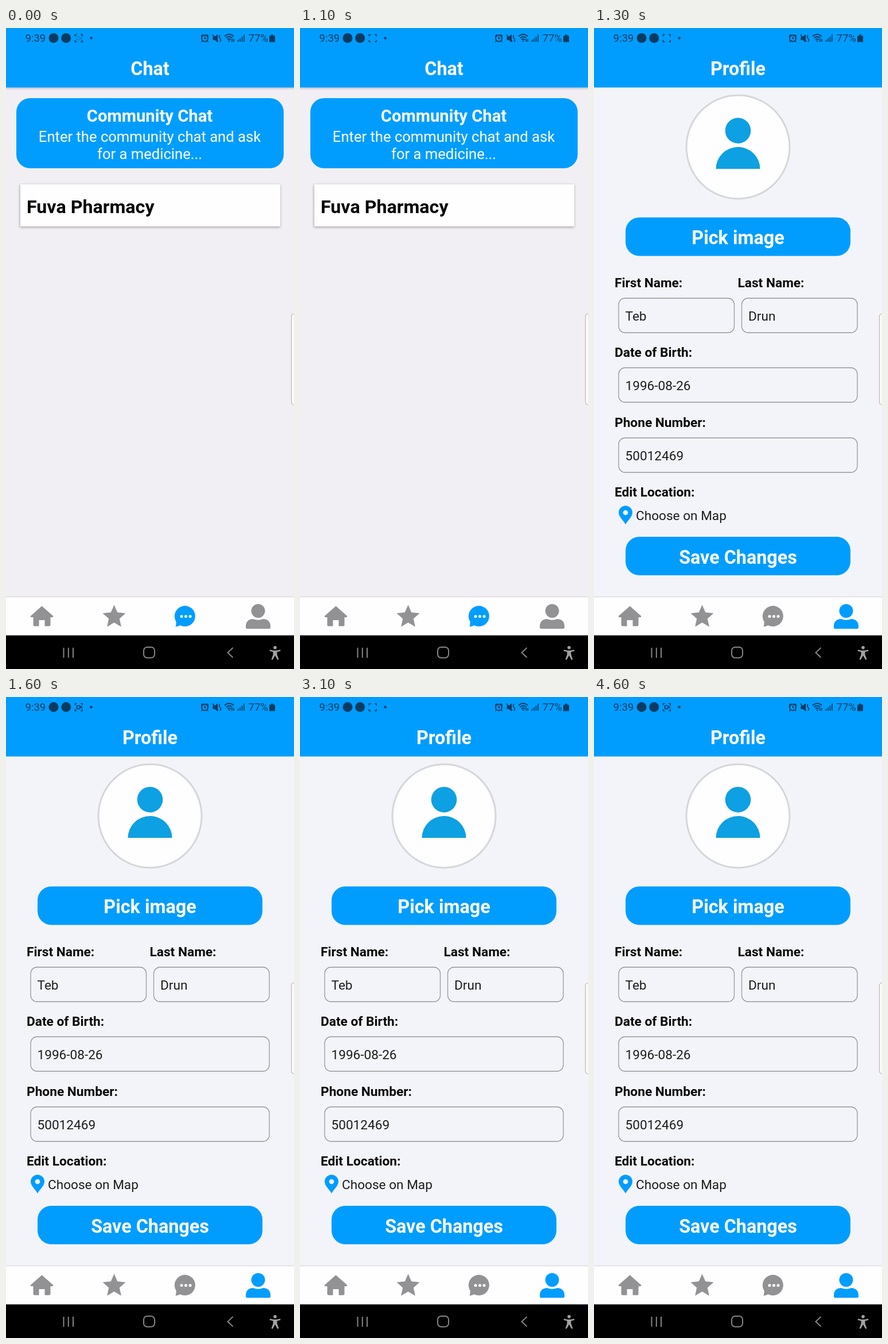
These frames come from a looping animation (502x1115 px, 4.8 s). An HTML page:

```html
<!DOCTYPE html>
<html lang="en">
<head>
<meta charset="utf-8">
<title>Chat and profile screens</title>
<style>
html, body { margin: 0; width: 100%; height: 100%; overflow: hidden; background: #000; }
svg { display: block; width: 502px; height: 1115px; }
text { font-family: Roboto, sans-serif; }
.title { font-size: 32.3px; font-weight: 700; fill: #fff; text-anchor: middle; }
.heading { font-size: 29.2px; }
.sub { font-size: 25.6px; fill: #fff; text-anchor: middle; }
.shop { font-size: 32.2px; font-weight: 700; fill: #060606; }
.label { font-size: 22.7px; font-weight: 700; fill: #080808; }
.value { font-size: 22.6px; fill: #1d1d1f; }
.status { font-size: 18.5px; fill: #073b61; }
.blue { fill: #009dff; }
.field { fill: none; stroke: #98989b; stroke-width: 1.3; }
.ink { fill: #073b61; }
.line { fill: none; stroke: #073b61; stroke-width: 1.7; }
.key { fill: none; stroke: #858585; stroke-width: 2; }
</style>
</head>
<body>
<svg viewBox="0 0 502 1115">
  <defs>
    <linearGradient id="fade" x1="0" y1="0" x2="0" y2="1">
      <stop offset="0" stop-color="#000" stop-opacity=".16"/>
      <stop offset="1" stop-color="#000" stop-opacity="0"/>
    </linearGradient>
    <filter id="soft" x="-5%" y="-20%" width="110%" height="140%">
      <feGaussianBlur stdDeviation="2"/>
    </filter>
  </defs>

  <rect id="page" width="502" height="1115"/>
  <rect class="blue" width="502" height="103.5"/>

  <g id="chat">
    <rect y="103.5" width="502" height="5" fill="url(#fade)"/>
    <text class="title" x="251" y="82">Chat</text>
    <rect class="blue" x="18" y="122" width="466" height="122" rx="24"/>
    <text class="title heading" x="250.5" y="162.5">Community Chat</text>
    <text class="sub" x="250.5" y="197.5">Enter the community chat and ask</text>
    <text class="sub" x="250.5" y="227.5">for a medicine...</text>
    <rect x="24" y="273" width="454" height="74" fill="#000" opacity=".28" filter="url(#soft)"/>
    <rect x="25" y="272" width="453" height="73" fill="#fefdff"/>
    <text class="shop" x="36" y="321.5">Fuva Pharmacy</text>
  </g>

  <g id="profile">
    <text class="title" x="251" y="82">Profile</text>
    <g id="avatar">
      <circle cx="251" cy="207" r="90" fill="#fefdff" stroke="#d5d7db" stroke-width="3"/>
      <g fill="#0da0e2">
        <circle cx="251" cy="178.5" r="22.3"/>
        <path d="M212.5 245a38.5 38 0 0 1 77 0z"/>
      </g>
    </g>
    <rect class="blue" x="55" y="329.5" width="392" height="67" rx="24"/>
    <text class="title" x="251" y="375.5">Pick image</text>
    <g id="form"></g>
    <path class="blue" d="M55 863.5c-3-6-12-13-12-20.500a12 12 0 0 1 24 0c0 7.500-9 14.500-12 20.500z"/>
    <circle cx="55" cy="843" r="4.300" fill="#f3f4f9"/>
    <text class="value" x="73" y="856">Choose on Map</text>
    <rect class="blue" x="55" y="885" width="392" height="67" rx="24"/>
    <text class="title" x="251" y="931.5">Save Changes</text>
  </g>

  <rect x="497.500" y="497" width="16" height="158.500" rx="5" fill="#fbf9fa" stroke="#bfb0ad" stroke-width="1.100"/>

  <!-- status bar -->
  <text class="status" x="33.500" y="24">9:39</text>
  <circle class="ink" cx="83" cy="17.500" r="8.500"/>
  <circle class="ink" cx="104.700" cy="17.500" r="8.500"/>
  <path class="line" stroke-width="1.400" d="M120.500 14.500v-3h3M130 11.500h3v3M133 21v3h-3M123.500 24h-3v-3"/>
  <g id="recording">
    <rect class="line" x="123.500" y="15" width="5.500" height="5.500" rx="1"/>
    <path class="ink" d="M129 17.800l3.500-2.500v5z"/>
  </g>
  <circle class="ink" cx="148.500" cy="17.500" r="2.200"/>
  <g class="line">
    <circle cx="346.500" cy="18" r="5.500" stroke-width="2"/>
    <path d="M340 14.500l3.500-3M353 14.500l-3.500-3M346.500 15v3.500h2.500M342 22.500l-1.500 2M351 22.500l1.500 2"/>
    <path d="M360 11.500l10 12M373 12.500q-3 2.500 0 5.500t0 6"/>
    <path d="M381 14.500q8-7 16 0M383.500 17.500q5.500-4.500 11 0M386 20.500q3-2.500 6 0"/>
    <path d="M394 19v5M397 24v-5M404.500 24v-3.500M408 24v-6M411.500 24v-9M415 24V11.500"/>
  </g>
  <path class="ink" d="M360.500 15h3.500l5-4v14l-5-4h-3.500zM387 22h4l-2 2.500zM459 13.500h3v-2h4v2h3V24.500h-10z"/>
  <text class="status" x="422.500" y="24">77%</text>

  <!-- tab bar -->
  <rect y="989.500" width="502" height="67" fill="#fefdff"/>
  <path d="M0 989.500h502" stroke="#dddce1" stroke-width="1.300"/>
  <g fill="#929294">
    <path d="M62.500 1005.500l19.500 17.200q1 2.300-1.500 2.300h-3v13q0 2.500-2.500 2.500h-7.500v-10.500h-10v10.500H50q-2.500 0-2.500-2.500v-13h-3q-2.500 0-1.500-2.300z"/>
    <path id="star"/>
    <path id="chatTab" d="M295.500 1041.500q1.500-5 1-9a18 18 0 1 1 7 6.500q-3 1.500-8 2.500z"/>
    <g id="profileTab">
      <circle cx="439.500" cy="1014" r="12"/>
      <path d="M418 1042.500v-3q1-11 12.500-11.500q9 3.500 18 0q11.500.5 12.500 11.500v3q0 2.500-2.500 2.500h-38q-2.500 0-2.500-2.500z"/>
    </g>
  </g>
  <g fill="#fefdff">
    <circle cx="306" cy="1023.500" r="2.500"/>
    <circle cx="313.500" cy="1023.500" r="2.500"/>
    <circle cx="321" cy="1023.500" r="2.500"/>
  </g>

  <!-- system keys -->
  <rect y="1056.500" width="502" height="58.500"/>
  <g class="key">
    <path d="M100.500 1078v17.500M108.800 1078v17.500M117 1078v17.500"/>
    <rect x="240" y="1077" width="19" height="18.500" rx="6"/>
    <path d="M395.500 1078l-9 8.500 9 8.500"/>
  </g>
  <g fill="#a2a2a2">
    <circle cx="469" cy="1077.800" r="2.800"/>
    <path d="M460 1081.500l6 1.300h6l6-1.300.5 2.200-6 1.600v5l3 8-2.300.8-4.200-7.600-4.200 7.600-2.300-.8 3-8v-5l-6-1.600z"/>
  </g>
</svg>
<script>
const LOOP = 4800;
const $ = id => document.getElementById(id);

const label = (x, y, text) => `<text class="label" x="${x}" y="${y}">${text}</text>`;
const field = (x, y, width, name, value) =>
  label(x - 7, y - 19, name) +
  `<rect class="field" x="${x}" y="${y}" width="${width}" height="60" rx="11"/>` +
  `<text class="value" x="${x + 11.500}" y="${y + 39}">${value}</text>`;

$('form').innerHTML =
  field(43, 470, 201.5, 'First Name:', 'Teb') +
  field(257.5, 470, 201.5, 'Last Name:', 'Drun') +
  field(43, 591, 416, 'Date of Birth:', '1996-08-26') +
  field(43, 713, 416, 'Phone Number:', '50012469') +
  label(36, 815, 'Edit Location:');

const starPoints = Array.from({ length: 10 }, (_, i) => {
  const radius = i % 2 ? 9.8 : 21;
  const angle = i * Math.PI / 5;
  return `${188.5 + radius * Math.sin(angle)} ${1024.500 - radius * Math.cos(angle)}`;
});
$('star').setAttribute('d', `M${starPoints.join('L')}z`);

// Each table holds [start in ms, value]; values switch without blending.
const screens = [[0, 'chat'], [1200, 'blank'], [1300, 'profile']];
const blink = [
  [0, .3], [100, 0], [600, 1], [1000, .3], [1100, 0], [1600, 1], [2100, 0],
  [2600, 1], [3000, .3], [3100, 0], [3600, 1], [4000, .3], [4100, 0], [4600, 1]
];
const pageColors = { chat: '#f1eff3', blank: '#f5f2fb', profile: '#f3f4f9' };
const valueAt = (steps, time) => steps.findLast(([start]) => start <= time)[1];
const show = (id, visible) => $(id).style.display = visible ? '' : 'none';

function render(time) {
  const screen = valueAt(screens, time);
  const inChat = screen === 'chat';
  show('chat', inChat);
  show('profile', !inChat);
  show('avatar', screen === 'profile');
  $('page').style.fill = pageColors[screen];
  $('chatTab').style.fill = inChat ? '#009dff' : '';
  $('profileTab').style.fill = inChat ? '' : '#009dff';
  $('recording').style.opacity = valueAt(blink, time);
}

const begin = performance.now();
function tick() {
  render((performance.now() - begin) % LOOP);
  requestAnimationFrame(tick);
}
tick();
</script>
</body>
</html>
```
